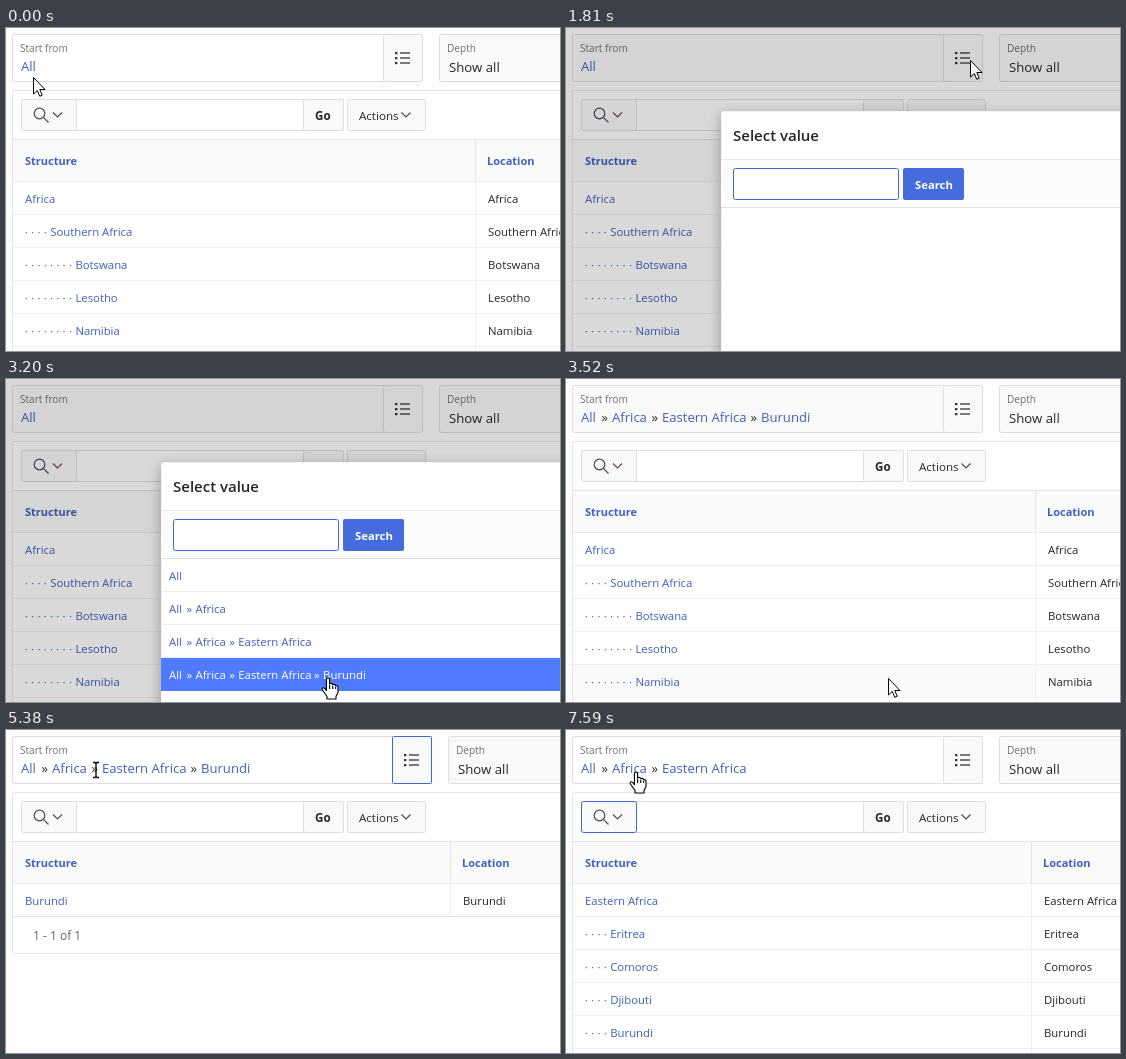
An HTML page that plays this animation: 554 px wide and 323 px high, repeating every 8000 ms.

```html
<!DOCTYPE html>
<html lang="en">
<head>
<meta charset="utf-8">
<title>Hierarchy report filter</title>
<style>
html, body { margin: 0; width: 100%; height: 100%; overflow: hidden; background: #fdfdfd; }
svg { display: block; width: 100%; height: 100%; font-family: "Open Sans", "Noto Sans", sans-serif; }
</style>
</head>
<body>
<svg viewBox="0 0 554 323" xmlns="http://www.w3.org/2000/svg">
  <defs>
    <filter id="shadow" x="-20%" y="-20%" width="140%" height="140%">
      <feGaussianBlur stdDeviation="7"/>
    </filter>
  </defs>
  <g id="scene"></g>
  <path id="caret" d="M176 147V165" stroke="#111" stroke-width="1.4"/>
  <g id="pointer"></g>
</svg>
<script>
const LOOP = 8000;
const LINK = '#4160bd', INK = '#262626', GREY = '#707070', EDGE = '#dedede', SOFT = '#f9f9f9', FOCUS = '#3f66d6';
const OPEN = 1200, FORM = 1270, LIST = 2498, CLOSE = 3370, NARROWED = 3838, CLIMB = 6510, WIDENED = 7036;

// Bursts of pointer movement: start, end, number of steps
const bursts = [
  [170, 950, 11], [1810, 2040, 4], [2190, 2960, 11], [3040, 3200, 3],
  [4530, 5290, 11], [5380, 5610, 4], [5870, 6240, 6], [6720, 7510, 11], [7590, 7590, 1]
];

// Pointer path: time, x, y
const path = [
  [93, 27, 49], [248, 22, 56], [404, 25, 39], [640, 200, 30], [950, 404, 32],
  [1810, 404, 32], [2040, 400, 32], [2113, 400, 32], [2498, 372, 88], [2806, 323, 188],
  [2960, 322, 283], [3200, 322, 299], [4454, 322, 299], [4758, 150, 110], [4986, 26, 26],
  [5138, 30, 38], [5290, 72, 40], [5380, 90, 40], [5610, 107, 41], [5796, 107, 41],
  [6018, 72, 42], [6240, 110, 41], [7115, 110, 41], [7510, 74, 42], [7590, 70, 42]
];

const crumbs = [['All', 15, 31], ['Africa', 46, 81], ['Eastern Africa', 96, 180], ['Burundi', 195, 243]];

const reports = {
  africa: { line: 469, rows: [['Africa', 0], ['Southern Africa', 4], ['Botswana', 8], ['Lesotho', 8], ['Namibia', 8]] },
  burundi: { line: 444, rows: [['Burundi', 0]], footer: '1 - 1 of 1' },
  eastern: { line: 465, rows: [['Eastern Africa', 0], ['Eritrea', 4], ['Comoros', 4], ['Djibouti', 4], ['Burundi', 4]] }
};

const pointers = {
  arrow: '<path d="M.5 .5V17L4.3 13.5L6.8 19.3L9.2 18.2L6.8 12.5H12Z" fill="#fff" stroke="#000"/>',
  hand: '<path d="M-1.6 13V1.6Q-1.6 0 0 0T1.6 1.6V6.5Q1.8 5.3 3.2 5.4T4.7 7.2Q5 6.2 6.3 6.4T7.6 8.2Q8 7.4 9.2 7.8T10 9.6V14.5L8 18.5V21H-1V18.5L-5.6 12Q-6.4 10.2 -5 9.8T-1.6 12.6Z" fill="#fff" stroke="#000" stroke-width="1.1"/><path d="M1.6 7V11M4.7 8V11M7.6 9V11" stroke="#000" stroke-width="1.1"/>',
  beam: '<path d="M-3 -7.5H-1L0 -6.5L1 -7.5H3M-3 7.5H-1L0 6.5L1 7.5H3M0 -7V7" fill="none" stroke="#000" stroke-width="1.3"/>'
};

const text = (s, x, y, size, fill, weight = 400) =>
  `<text x="${x}" y="${y}" font-size="${size}" fill="${fill}" font-weight="${weight}">${s}</text>`;
const fillRect = (x, y, w, h, fill, extra = '') =>
  `<rect x="${x}" y="${y}" width="${w}" height="${h}" fill="${fill}" ${extra}/>`;
const box = (x, y, w, h, fill, edge = EDGE, rx = 2) =>
  fillRect(x + .5, y + .5, w, h, fill, `stroke="${edge}" rx="${rx}"`);
const stroke = (d, color, width = 1) =>
  `<path d="${d}" fill="none" stroke="${color}" stroke-width="${width}"/>`;
const chevron = (x, y, color) => stroke(`M${x} ${y}l4.5 4.5l4.5 -4.5`, color, 1.2);

function stepTime(t) {
  let out = 0;
  for (const [from, to, n] of bursts) {
    if (t < from) break;
    const step = n > 1 ? (to - from) / (n - 1) : 1;
    out = Math.min(to, from + Math.floor((t - from) / step + 1e-6) * step);
  }
  return out;
}

function pointerAt(t) {
  let a = path[0];
  for (const b of path) {
    if (t < b[0]) {
      const k = Math.max(0, (t - a[0]) / (b[0] - a[0] || 1));
      return [a[1] + (b[1] - a[1]) * k, a[2] + (b[2] - a[2]) * k];
    }
    a = b;
  }
  return [a[1], a[2]];
}

function stateAt(t) {
  const [x, y] = pointerAt(stepTime(t));
  const s = {
    x, y,
    modal: t >= OPEN && t < CLOSE,
    form: t >= FORM,
    list: t >= LIST,
    depth: t < CLOSE ? 1 : t < CLIMB ? 4 : 3,
    report: t < NARROWED ? 'africa' : t < WIDENED ? 'burundi' : 'eastern',
    listFocus: t >= NARROWED && t < CLIMB,
    searchFocus: t >= WIDENED
  };
  s.shift = s.report === 'burundi' ? 9 : 0;
  s.split = 377 + s.shift;
  s.caret = (t >= 1280 && t < 1810) || (t >= 2340 && t < 2870);
  s.inField = !s.modal && y > 6 && y < 54 && x > 6 && x < s.split;
  s.row = !s.modal && y >= 153 ? Math.floor((y - 153) / 33) : -1;
  s.choice = s.modal && s.list && y >= 180 && x > 155 ? Math.floor((y - 180) / 33) : -1;
  s.kind = pointerKind(s);
  return s;
}

function pointerKind({ x, y, modal, choice, split, shift, depth }) {
  if (modal) {
    const onSearch = x > 337 && x < 398 && y > 140 && y < 172;
    return choice >= 0 || onSearch ? 'hand' : 'arrow';
  }
  if (y > 6 && y < 54 && x > split && x < 416 + shift) return 'hand';
  const shown = crumbs.slice(0, depth);
  if (y < 33 || y > 46 || x < 15 || x > shown[depth - 1][2]) return 'arrow';
  return shown.some(([, l, r]) => x >= l && x <= r) ? 'hand' : 'beam';
}

function trail(x, y, count, size, link, mark, scale) {
  return crumbs.slice(0, count).map(([name, left], i) => {
    const at = x + (left - 15) * scale;
    const sep = i ? text('»', (at - 10.5 * scale).toFixed(1), y, size, mark) : '';
    return sep + text(name, at.toFixed(1), y, size, link);
  }).join('');
}

function filters(s) {
  const { split, shift } = s;
  const right = 416 + shift;
  let out = box(6, 6, right - 6, 47, s.inField ? '#fff' : SOFT);
  out += box(split, 6, right - split, 47, SOFT, s.listFocus ? FOCUS : EDGE, s.listFocus ? 1 : 2);
  out += text('Start from', 14, 24, 10.1, GREY) + trail(15, 43, s.depth, 13.1, LINK, INK, 1);
  for (const y of [25, 30, 35]) {
    out += fillRect(split + 12, y - 1, 2.4, 2.2, '#333') + stroke(`M${split + 17} ${y}H${split + 27}`, '#333', 1.3);
  }
  out += box(433 + shift, 6, 140, 47, SOFT);
  return out + text('Depth', 441 + shift, 24, 10.1, GREY) + text('Show all', 443 + shift, 44, 13.2, INK);
}

function toolbar(s) {
  return box(15, 71, 322, 31, '#fff') + box(297, 71, 40, 31, SOFT) +
    box(15, 71, 55, 31, SOFT, s.searchFocus ? FOCUS : EDGE) +
    '<circle cx="33.5" cy="85.5" r="5.3" fill="none" stroke="#444a60" stroke-width="1.2"/>' +
    stroke('M37.4 89.4L42.5 94.5', '#444a60', 1.2) + chevron(47, 84.5, '#6a4a44') +
    text('Go', 309, 92, 11.6, INK, 700) +
    box(341, 71, 78, 31, SOFT) + text('Actions', 353, 92, 11.6, INK) + chevron(395.5, 84.5, '#444a60');
}

function table(s) {
  const { line, rows, footer } = reports[s.report];
  const end = footer ? 186 : 323;
  let out = box(6, 62, 600, footer ? 161 : 300, '#fff', '#e4e4e4');
  out += toolbar(s) + fillRect(7, 111, 547, 42, '#fafafa');
  if (s.row >= 0 && s.row < rows.length) out += fillRect(7, 153 + 33 * s.row, 547, 33, '#fafafa');
  out += stroke('M7 111.5H554', '#e4e4e4') + stroke('M7 153.5H554', '#ececec');
  out += stroke(`M${line + .5} 112V153`, '#e2e2e2') + stroke(`M${line + .5} 153V${end}`, '#f0f0f0');
  out += text('Structure', 19, 137, 11, LINK, 700) + text('Location', line + 12, 137, 11, LINK, 700);
  rows.forEach(([name, dots], i) => {
    const y = 175 + 33 * i;
    for (let d = 0; d < dots; d++) out += text('·', (18.8 + d * 6.3).toFixed(1), y, 11.3, LINK);
    out += text(name, (19 + dots * 6.3).toFixed(1), y, 11.35, LINK) + text(name, line + 13, y, 11.35, INK);
    out += stroke(`M7 ${186.5 + 33 * i}H554`, footer ? '#e2e2e2' : '#efefef');
  });
  return out + (footer ? text(footer, 27, 210, 12, '#666') : '');
}

function dialog(s) {
  let out = fillRect(0, 0, 554, 323, '#000', 'opacity=".15"');
  out += fillRect(155, 87, 460, 300, '#000', 'opacity=".3" filter="url(#shadow)"');
  out += box(155, 83, 460, 300, '#fff', '#f4f4f4') + text('Select value', 167, 113, 15, INK, 600);
  out += stroke('M155 131.5H554', '#e8e8e8');
  if (!s.form) return out;
  out += fillRect(155, 132, 399, 47, '#fcfcfc') + stroke('M155 179.5H554', '#e0e0e0');
  out += box(167, 140, 165, 31, '#fff', FOCUS) + fillRect(337, 140, 61, 32, '#466bdd', 'rx="2"');
  out += text('Search', 349, 161, 11.3, '#fff', 700);
  if (!s.list) return out;
  for (let i = 0; i < 4; i++) {
    const on = i === s.choice, y = 180 + 33 * i;
    if (on) out += fillRect(155, y, 399, 33, '#507aff');
    out += trail(163, y + 21, i + 1, 11.35, on ? '#fff' : LINK, on ? '#fff' : LINK, .856);
    if (!on) out += stroke(`M155 ${y + 32.5}H554`, '#ececec');
  }
  return out;
}

const scene = document.getElementById('scene');
const caret = document.getElementById('caret');
const pointer = document.getElementById('pointer');
let lastScene = '', lastKind = '';

function draw(t) {
  const s = stateAt(t);
  const markup = fillRect(0, 0, 554, 323, '#fdfdfd') + filters(s) + table(s) + (s.modal ? dialog(s) : '');
  if (markup !== lastScene) scene.innerHTML = lastScene = markup;
  if (s.kind !== lastKind) pointer.innerHTML = pointers[lastKind = s.kind];
  pointer.setAttribute('transform', `translate(${Math.round(s.x)} ${Math.round(s.y)})`);
  caret.setAttribute('visibility', s.caret ? 'visible' : 'hidden');
}

const start = performance.now();
function tick() {
  draw((performance.now() - start) % LOOP);
  requestAnimationFrame(tick);
}
tick();
</script>
</body>
</html>
```
